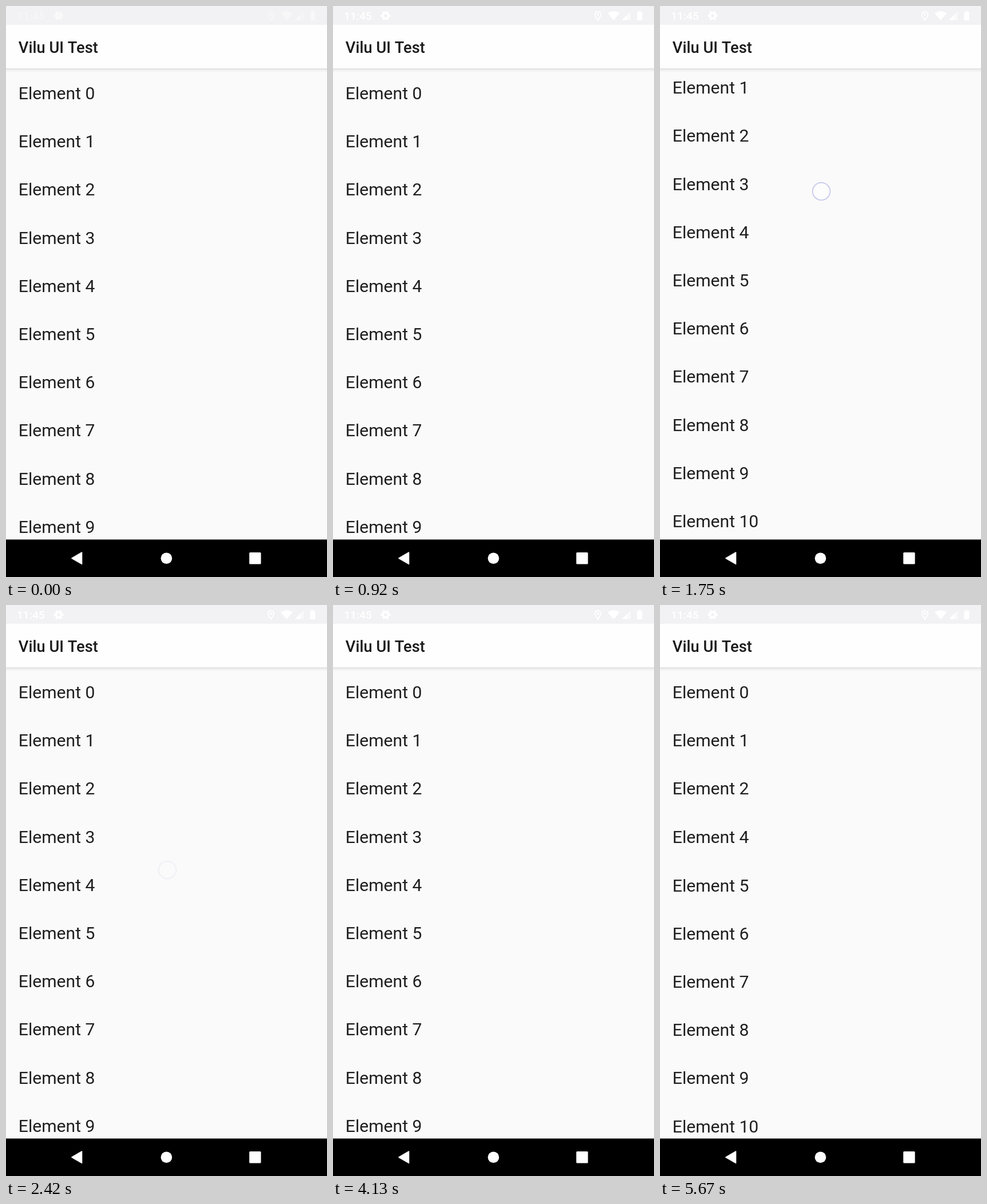
Animation, 561 px wide and 998 px high, one loop 5.75 s. Source, as an HTML page with a canvas:

```html
<!DOCTYPE html>
<html lang="en">
<head>
<meta charset="utf-8">
<title>List swipe demo</title>
<style>
  html, body { margin: 0; width: 100%; height: 100%; overflow: hidden; background: #fafafa; }
  canvas { display: block; width: 561px; height: 998px; }
</style>
</head>
<body>
<canvas></canvas>
<script>
const W = 561, H = 998, LOOP = 5750;
const MARGIN = 21.8, PITCH = 84.2, SWIPED = 3;
const STATUS_H = 32.7, BAR_BOTTOM = 109, NAV_TOP = 932.5;
const canvas = document.querySelector('canvas');
const ctx = canvas.getContext('2d');
const dpr = window.devicePixelRatio || 1;
canvas.width = W * dpr;
canvas.height = H * dpr;

const ramp = (t, a, b) => Math.min(1, Math.max(0, (t - a) / (b - a)));
const ease = (t, a, b) => (1 - Math.cos(Math.PI * ramp(t, a, b))) / 2;
const visible = (t, down, up) => ramp(t, down, down + 60) - ramp(t, up, up + 170);

// The fingers lead; list and row follow them
function pose(t) {
  const dragY = 435 - 111 * ease(t, 1300, 1720) + 139 * ease(t, 1880, 2340);
  const peekX = 150 + 170 * (ease(t, 2560, 2800) - 0.9 * ease(t, 2840, 3060));
  const flingX = 142 + 600 * ease(t, 5010, 5260);
  return {
    scroll: Math.max(0, 418 - dragY),
    swipe: Math.max(0, peekX - 167) + Math.max(0, flingX - 152),
    collapse: PITCH * ease(t, 5400, 5690),
    touches: [
      { x: 282, y: dragY, alpha: visible(t, 1240, 2290) },
      { x: peekX, y: 401, alpha: visible(t, 2500, 3095) },
      { x: flingX, y: 399, alpha: visible(t, 4982, 5120) }
    ]
  };
}

function rect(x, y, w, h, color) {
  ctx.fillStyle = color;
  ctx.fillRect(x, y, w, h);
}

function shape(color, ...points) {
  ctx.fillStyle = color;
  ctx.beginPath();
  points.forEach(([x, y]) => ctx.lineTo(x, y));
  ctx.closePath();
  ctx.fill();
}

function disc(x, y, r, color) {
  ctx.fillStyle = color;
  ctx.beginPath();
  ctx.arc(x, y, r, 0, 7);
  ctx.fill();
}

function stroke(color, width) {
  ctx.strokeStyle = color;
  ctx.lineWidth = width;
  ctx.stroke();
}

function text(str, x, y, size, weight, color) {
  ctx.font = `${weight} ${size}px Roboto, sans-serif`;
  ctx.fillStyle = color;
  ctx.fillText(str, x, y);
}

function drawList({ scroll, swipe, collapse }) {
  for (let i = 0; i < 13; i++) {
    const x = MARGIN + (i === SWIPED ? swipe : 0);
    const y = 163 + i * PITCH - scroll - (i > SWIPED ? collapse : 0);
    text('Element ' + i, x, y, 30.1, 400, '#1f1f1f');
  }
}

function drawToolbar() {
  const shadow = ctx.createLinearGradient(0, BAR_BOTTOM, 0, BAR_BOTTOM + 7);
  shadow.addColorStop(0, 'rgba(0,0,0,.13)');
  shadow.addColorStop(0.35, 'rgba(0,0,0,.05)');
  shadow.addColorStop(1, 'rgba(0,0,0,0)');
  rect(0, BAR_BOTTOM, W, 7, shadow);
  rect(0, 0, W, BAR_BOTTOM, '#fefefe');
  text('Vilu UI Test', MARGIN, 81.6, 27.3, 500, '#1a1a1a');
}

function drawGear(x, y) {
  ctx.beginPath();
  for (let i = 0; i < 6; i++) {
    const a = i * Math.PI / 3;
    ctx.moveTo(x, y);
    ctx.lineTo(x + 8.5 * Math.cos(a), y + 8.5 * Math.sin(a));
  }
  stroke('#fff', 4);
  disc(x, y, 6.5, '#fff');
  disc(x, y, 2.8, '#f2f2f4');
}

function drawStatusBar(t) {
  rect(0, 0, W, STATUS_H, '#f2f2f4');
  ctx.globalAlpha = 0.4 + 0.6 * ramp(t, 0, 500);
  text('11:45', 19, 24, 19.2, 500, '#fff');
  drawGear(92, 17);
  // location pin
  ctx.beginPath();
  ctx.arc(463, 15, 5.2, Math.PI * 0.85, Math.PI * 2.15);
  ctx.lineTo(463, 25);
  ctx.closePath();
  stroke('#fff', 1.8);
  disc(463, 15, 2, '#fff');
  // wifi
  ctx.beginPath();
  ctx.moveTo(490.5, 25);
  ctx.lineTo(480, 12.5);
  ctx.quadraticCurveTo(490.5, 5.5, 501, 12.5);
  ctx.fill();
  // signal
  shape('rgba(255,255,255,.5)', [505, 24.5], [520, 24.5], [520, 9.5]);
  shape('#fff', [505, 24.5], [514, 24.5], [514, 15.5]);
  // battery
  rect(531.5, 10.5, 9, 14.5, '#fff');
  rect(534, 8.5, 4, 2, '#fff');
  ctx.globalAlpha = 1;
}

function drawNavBar() {
  rect(0, NAV_TOP, W, H - NAV_TOP, '#000');
  ctx.lineJoin = 'round';
  shape('#fff', [115, 965.2], [132.5, 955], [132.5, 975.4]);
  stroke('#fff', 1.6);
  disc(280.4, 965.2, 9.8, '#fff');
  ctx.beginPath();
  ctx.roundRect(425.2, 955, 20.4, 20.4, 1.5);
  ctx.fill();
}

function drawTouch({ x, y, alpha }) {
  ctx.globalAlpha = alpha;
  disc(x, y, 15, 'rgba(255,255,255,.55)');
  ctx.beginPath();
  ctx.arc(x, y, 15.3, 0, 7);
  stroke('#cbcdec', 2);
  ctx.globalAlpha = 1;
}

function draw(t) {
  const now = pose(t);
  ctx.setTransform(dpr, 0, 0, dpr, 0, 0);
  rect(0, 0, W, H, '#fafafa');
  drawList(now);
  drawToolbar();
  drawStatusBar(t);
  drawNavBar();
  now.touches.forEach(drawTouch);
}

const start = performance.now();
function tick() {
  draw((performance.now() - start) % LOOP);
  requestAnimationFrame(tick);
}
tick();
</script>
</body>
</html>
```
